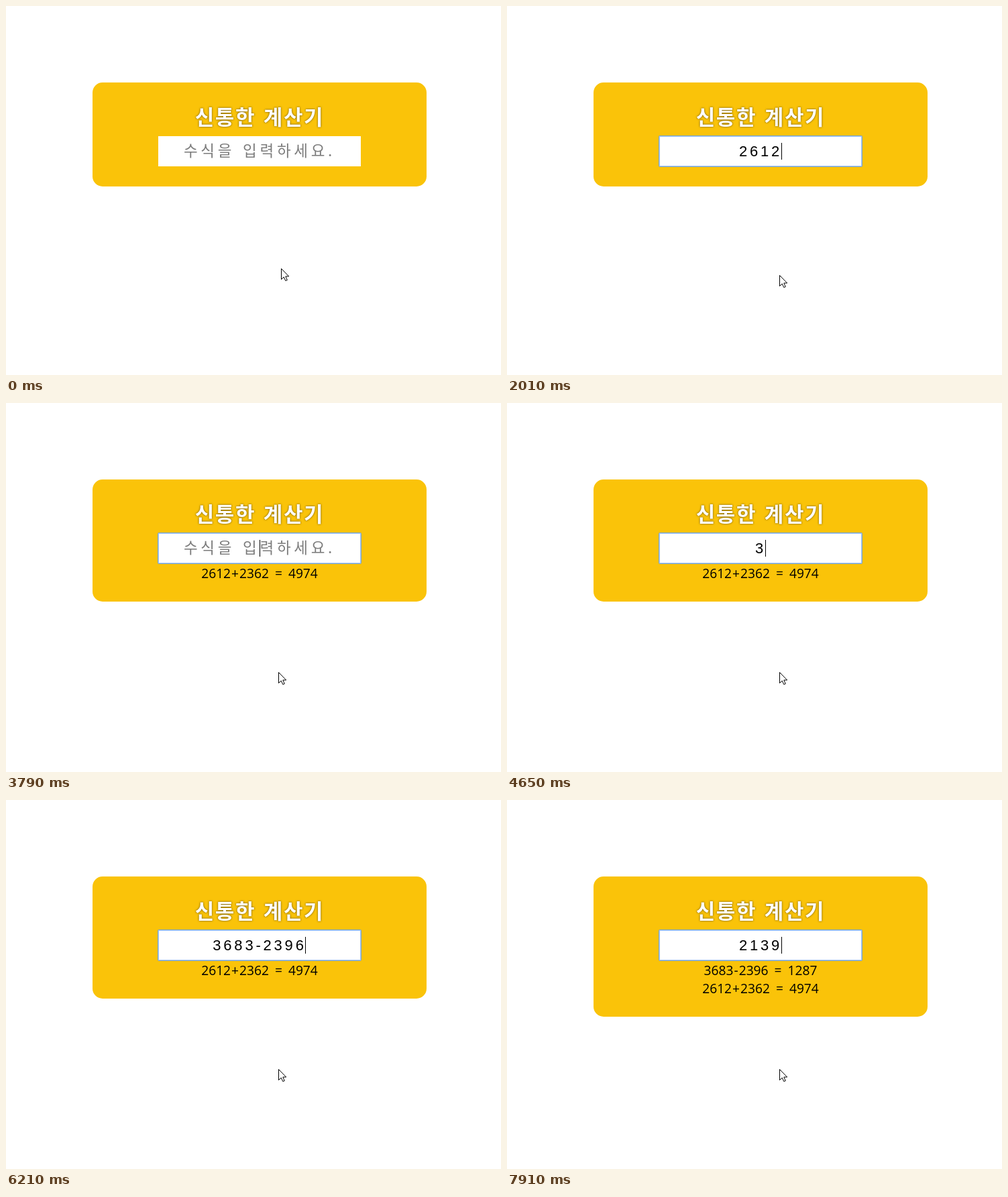
These frames come from a looping animation (738x550 px, 8000 ms). An HTML page:

```html
<!DOCTYPE html>
<html lang="ko">
<head>
<meta charset="utf-8">
<title>계산기</title>
<style>
  html, body { margin: 0; width: 100%; height: 100%; overflow: hidden; background: #fff; }
  svg { display: block; width: 738px; height: 550px; }
  text { text-anchor: middle; white-space: pre; }
  .title { font: 700 31px "Noto Sans CJK KR", "Noto Sans CJK", sans-serif; letter-spacing: 1.7px; word-spacing: 1px;
           fill: #fff; text-shadow: 0 0 3px rgba(0, 0, 0, .6); }
  .hint { font: 300 22.5px "Noto Sans CJK KR", "Noto Sans CJK", sans-serif; letter-spacing: 4.7px; word-spacing: 1px; fill: #7c7c7c; }
  .entry { font: 22px "Liberation Sans", Arial, sans-serif; letter-spacing: 3.8px; }
  .result { font: 19.2px "Open Sans", "Noto Sans", sans-serif; word-spacing: 3px; }
</style>
</head>
<body>
<svg viewBox="0 0 738 550">
  <rect id="card" x="129" y="114" width="498" height="155" rx="15" fill="#fac309"/>
  <text class="title" x="378" y="177">신통한 계산기</text>
  <rect x="227" y="194" width="302" height="45" fill="#fff"/>
  <g id="focus" fill="none">
    <rect x="226.5" y="193.5" width="303" height="46" rx="1" stroke="#78a5d2"/>
    <rect x="227.5" y="194.5" width="301" height="44" stroke="#a9c8f2"/>
  </g>
  <text id="hint" class="hint" x="378" y="224">수식을 입력하세요.</text>
  <text id="entry" class="entry" x="378" y="224"></text>
  <rect id="caret" y="204" width="1" height="25"/>
  <g id="results"></g>
  <g id="pointer">
    <path id="arrow" d="M.5 .5V16.5L4.2 13L6.8 18.5L9.3 17.5L6.8 12H11.7Z" fill="#fff" stroke="#000"/>
    <path id="beam" d="M0 .5H3M4 .5H7M3.5 1V15M0 15.5H3M4 15.5H7" fill="none" stroke="#000"/>
  </g>
</svg>
<script>
const LOOP = 8000, CENTER = 378, FOCUS = 690;
const $ = id => document.getElementById(id);
const show = (id, on) => $(id).setAttribute('display', on ? 'inline' : 'none');

// Each entry state: [time, text, caret visible]
const type = (prefix, keys, from, to) => [...keys].map((_, i) =>
  [from + (to - from) * i / (keys.length - 1), prefix + keys.slice(0, i + 1), true]);
const entries = [
  [0, '', false], [FOCUS, '', true], [1230, '', false],
  ...type('', '26', 1460, 1610), ...type('26', '12', 1860, 2010),
  ...type('2612', '+2362', 2550, 3250),
  [3790, '', true], [4330, '', false],
  ...type('', '3683', 4650, 5200), ...type('3683', '-2396', 5670, 6210),
  [6760, '', true], [7220, '', false],
  ...type('', '2139', 7390, 7910)
];

// Each pointer state: [time, x, y, is text beam]
const moves = [
  [0, 410, 391], [130, 414, 330], [210, 409, 268], [290, 401, 220, true],
  [850, 407, 262], [930, 405, 330], [1010, 406, 385], [1090, 406, 401]
];

const results = [[3790, '2612+2362 = 4974'], [6760, '3683-2396 = 1287']];

const current = (list, t) => list.filter(s => s[0] <= t).pop();

function drawResults(t) {
  const done = results.filter(r => r[0] <= t).reverse();
  $('card').setAttribute('height', 155 + 27 * done.length);
  $('results').innerHTML = done.map(([, sum], i) =>
    `<text class="result" x="${CENTER}" y="${261 + 27 * i}">` +
    sum.replace(/[-+=]/g, '<tspan dx="1" letter-spacing="1">$&</tspan>') + '</text>').join('');
}

function drawEntry(t) {
  const [, text, caret] = current(entries, t);
  $('entry').textContent = text;
  show('hint', !text);
  show('focus', t >= FOCUS);
  show('caret', caret);
  const x = text ? Math.floor(CENTER + $('entry').getComputedTextLength() / 2) - 1 : CENTER;
  $('caret').setAttribute('x', x);
}

function drawPointer(t) {
  const [, x, y, beam] = current(moves, t);
  $('pointer').setAttribute('transform', `translate(${x} ${y})`);
  show('arrow', !beam);
  show('beam', beam);
}

const start = performance.now();
function frame() {
  const t = (performance.now() - start) % LOOP;
  drawResults(t);
  drawEntry(t);
  drawPointer(t);
  requestAnimationFrame(frame);
}
frame();
</script>
</body>
</html>
```
